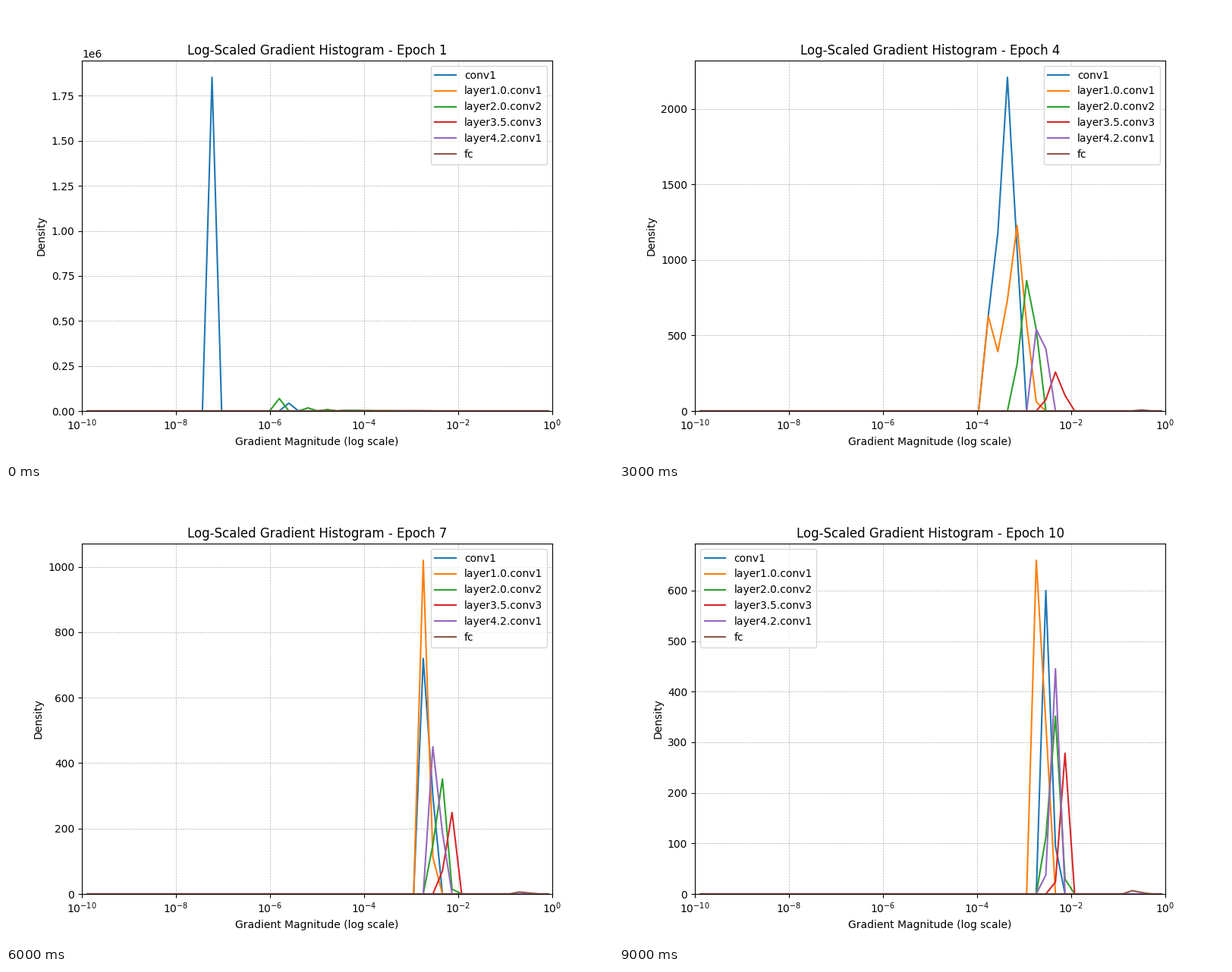
Write a matplotlib script that moves like this. It is 800 px wide and 600 px high and loops after 10000 ms.

```python
import numpy as np
import matplotlib.pyplot as plt
from matplotlib.animation import FuncAnimation

EPOCHS = 10
SAMPLES = 20
SWAY = 0.05
EDGES = np.logspace(-10, 0, 50)
WIDTHS = np.diff(EDGES)
CENTERS = (EDGES[:-1] + EDGES[1:]) / 2

# Evenly spaced quantiles of the log of an exponential variable:
# a compact peak with a long tail to the left.
QUANTILES = (np.arange(SAMPLES) + 0.5) / SAMPLES
SHAPE = np.log(-np.log(1 - QUANTILES))

# Key points of each layer's peak, in bins: centre, then spread.
CENTER_EPOCHS = [1, 3, 5, 7, 9]
SPREAD_EPOCHS = [1, 3, 5, 7]
LAYERS = {
    "conv1": ([39.45, 31.942, 34.05, 35.97, 36.94], [7, 0.775, 0.5, 0.22]),
    "layer1.0.conv1": ([33.65, 33.08, 34.78, 35.91, 36.01],
                       [2.2, 1.1, 0.54, 0.22]),
    "layer2.0.conv2": ([32.7, 33.78, 36.65, 37.53, 37.74],
                       [3.45, 0.87, 0.27, 0.4]),
    "layer3.5.conv3": ([36, 37.61, 38.25, 38.52, 38.63],
                       [0.8, 0.55, 0.3, 0.24]),
    "layer4.2.conv1": ([35, 35.84, 36.6, 36.97, 37.65],
                       [0.6, 0.33, 0.25, 0.22]),
    "fc": ([46.75, 46.75, 46.75, 46.1, 45.97], [0.18] * 4),
}


def density(index, centers, spreads, epoch):
    center = np.interp(epoch, CENTER_EPOCHS, centers)
    spread = np.interp(epoch, SPREAD_EPOCHS, spreads)
    # Neighbouring layers sway in opposite directions from epoch to epoch.
    center -= SWAY * (-1) ** (epoch + index)
    counts, _ = np.histogram(center + spread * SHAPE,
                             bins=np.arange(len(EDGES)))
    return counts / SAMPLES / WIDTHS


fig, ax = plt.subplots(figsize=(8, 6), dpi=100)


def draw(i):
    epoch = i + 1
    ax.clear()
    for index, (name, keys) in enumerate(LAYERS.items()):
        ax.plot(CENTERS, density(index, *keys, epoch), label=name)
    ax.set_xscale("log")
    ax.minorticks_off()
    ax.set_xlim(1e-10, 1)
    ax.set_ylim(bottom=0)
    ax.set_title(f"Log-Scaled Gradient Histogram - Epoch {epoch}")
    ax.set_xlabel("Gradient Magnitude (log scale)")
    ax.set_ylabel("Density")
    ax.grid(True, linestyle="--", linewidth=0.5)
    ax.legend(loc="best")
    return ax.lines


anim = FuncAnimation(fig, draw, frames=EPOCHS, init_func=lambda: draw(0),
                     interval=1000, repeat=True, repeat_delay=0)
plt.show()
```
